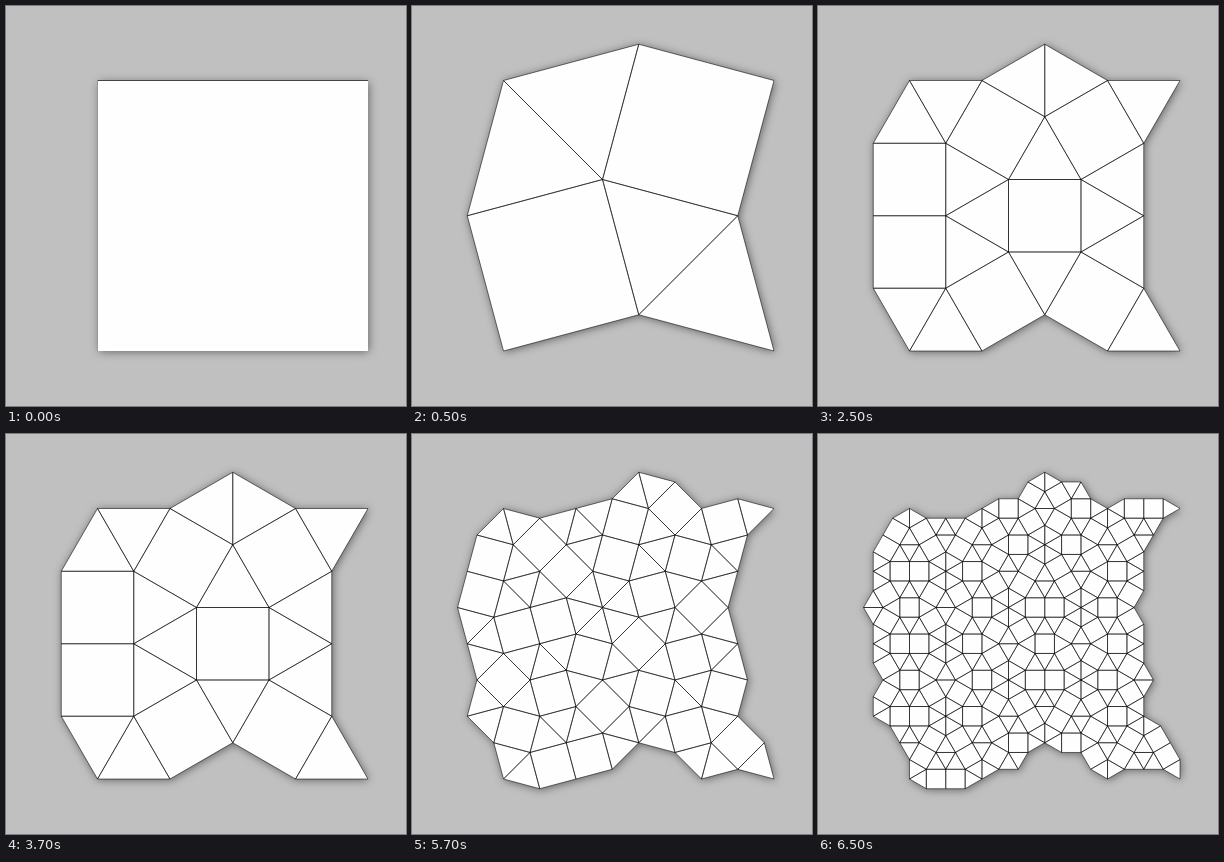
Write an HTML page with a canvas that moves like this. It is 400 px wide and 400 px high and loops after 8 s.

```html
<!DOCTYPE html>
<html>
<head>
<meta charset="utf-8">
<style>
html, body { margin: 0; width: 100%; height: 100%; overflow: hidden; background: #c0c0c0; }
canvas { display: block; }
</style>
</head>
<body>
<canvas id="stage" width="400" height="400"></canvas>
<script>
const ctx = document.getElementById('stage').getContext('2d');
const LOOP = 8000, CUTS = [500, 2500, 4500, 6500];
const X = 91.5, Y = 74.5, SIDE = 270.5;
const BEND = Math.tan(Math.PI / 12) / 2;

// Midpoint of an edge, pushed to its right (s = 1) or left (s = -1).
function mid(p, q, s) {
  const dx = q[0] - p[0], dy = q[1] - p[1];
  return [(p[0] + q[0]) / 2 - s * BEND * dy, (p[1] + q[1]) / 2 + s * BEND * dx];
}

// Substitution rules: two triangles (T, U) and two squares (S, Q).
const rules = {
  T([a, b, c]) {
    const m = mid(a, b, 1), n = mid(b, c, -1), k = mid(c, a, -1);
    return [['T', a, m, k], ['U', m, b, n], ['S', k, m, n, c]];
  },
  U([a, b, c]) {
    const m = mid(a, b, 1), n = mid(b, c, -1), k = mid(c, a, -1);
    return [['U', k, a, m], ['T', b, n, m], ['Q', m, n, c, k]];
  },
  Q([a, b, c, d]) {
    const m = mid(a, b, 1), n = mid(b, c, 1), k = mid(c, d, 1), l = mid(d, a, 1);
    return [['U', m, b, n], ['T', c, k, n], ['U', k, d, l], ['T', a, m, l], ['Q', n, k, l, m]];
  },
  S([a, b, c, d]) {
    const m = mid(a, b, 1), n = mid(b, c, 1), k = mid(c, d, -1), l = mid(d, a, -1);
    const o = [l[0] + m[0] - a[0], l[1] + m[1] - a[1]];
    return [['U', m, b, n], ['U', m, n, o], ['T', d, l, o], ['T', d, o, k],
            ['Q', o, l, a, m], ['S', k, o, n, c]];
  }
};

const levels = [[['S', [X + SIDE, Y], [X + SIDE, Y + SIDE], [X, Y + SIDE], [X, Y]]]];
for (let i = 0; i < CUTS.length; i++)
  levels.push(levels[i].flatMap(([type, ...pts]) => rules[type](pts)));

function trace(path, pts) {
  pts.forEach((p, i) => i ? path.lineTo(p[0], p[1]) : path.moveTo(p[0], p[1]));
  path.closePath();
}

function line(x1, y1, x2, y2, color) {
  ctx.strokeStyle = color;
  ctx.beginPath();
  ctx.moveTo(x1, y1);
  ctx.lineTo(x2, y2);
  ctx.stroke();
}

function draw(level) {
  ctx.fillStyle = '#c0c0c0';
  ctx.fillRect(0, 0, 400, 400);

  const area = new Path2D();
  for (const [, ...pts] of levels[level]) trace(area, pts);
  ctx.save();
  ctx.shadowColor = 'rgba(0,0,0,.5)';
  ctx.shadowBlur = 9;
  ctx.shadowOffsetX = ctx.shadowOffsetY = 1;
  ctx.fillStyle = '#fefefe';
  ctx.fill(area);
  ctx.restore();

  if (level === 0) {
    ctx.lineWidth = 1;
    line(X, Y, X + SIDE, Y, '#444');
    line(X, Y, X, Y + SIDE, '#999');
    return;
  }
  ctx.strokeStyle = '#000';
  ctx.lineWidth = 0.55;
  for (const [, ...pts] of levels[level]) {
    const tile = new Path2D();
    trace(tile, pts);
    ctx.stroke(tile);
  }
}

let shown = -1;
function tick() {
  const t = performance.now() % LOOP;
  const level = CUTS.filter(c => t >= c).length;
  if (level !== shown) draw(shown = level);
  requestAnimationFrame(tick);
}
tick();
</script>
</body>
</html>
```
